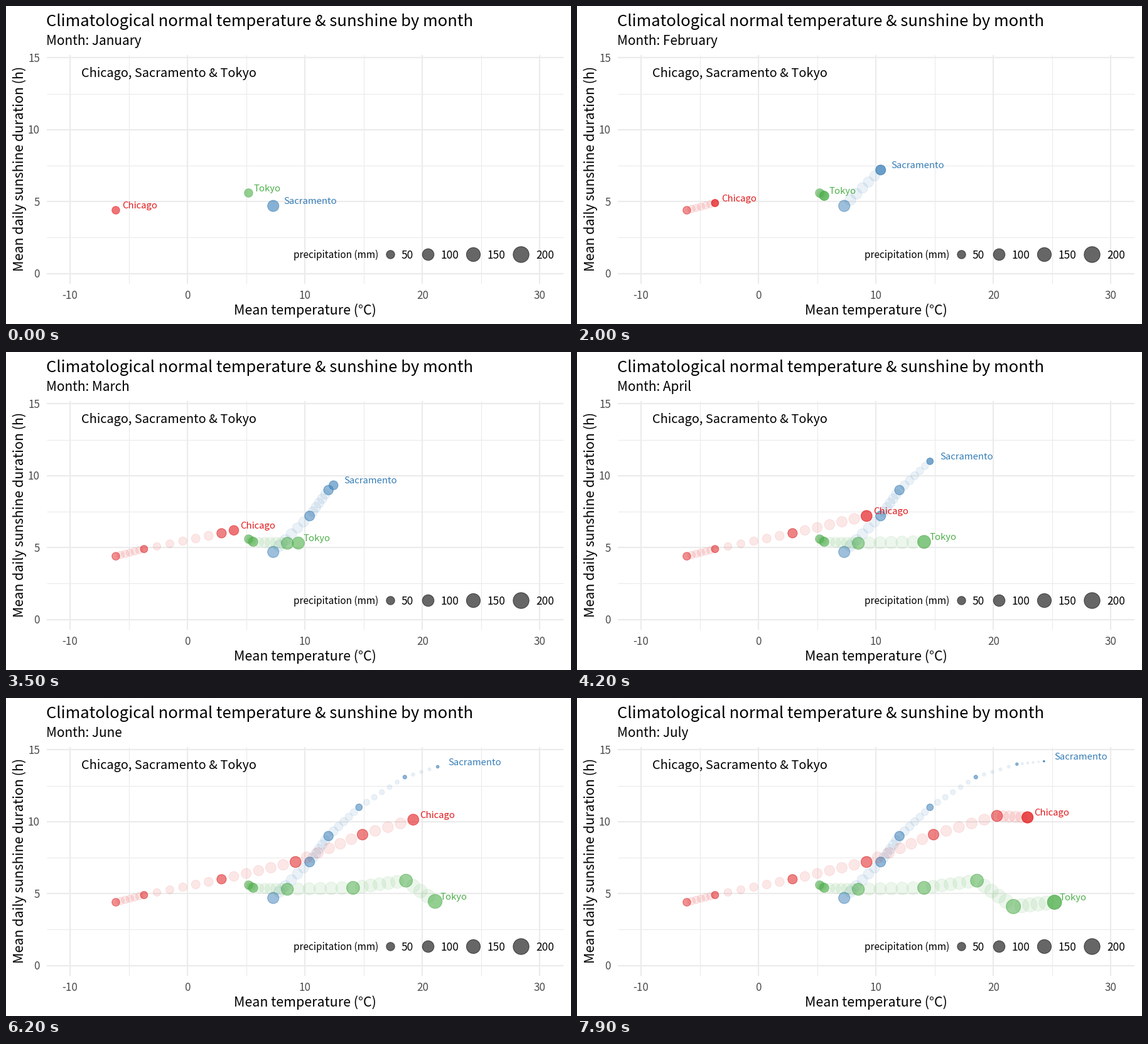
These frames come from a looping animation (900 px wide and 506 px high, 8000 ms). A matplotlib script:

```python
import math

import matplotlib.pyplot as plt
import numpy as np
from matplotlib.animation import FuncAnimation
from matplotlib.colors import to_rgba

W, H, DPI = 900, 506, 64
FRAMES, INTERVAL = 80, 100
PT = 72 / DPI  # points per pixel
START_PAUSE = 5
HOLD = 6
STEPS = [6, 6, 6, 6, 5, 5]
MONTHS = ["January", "February", "March", "April", "May", "June", "July"]

# name: colour, label offset, temperature, sunshine hours, dot radius in px
CITIES = {
    "Chicago": ("#E41A1C", 11.2,
                [-6.1, -3.7, 2.9, 9.2, 14.9, 20.3, 22.9],
                [4.4, 4.9, 6.0, 7.2, 9.1, 10.4, 10.3],
                [6.7, 6.3, 8.0, 9.3, 9.0, 9.4, 9.5]),
    "Sacramento": ("#377EB8", 16.9,
                   [7.3, 10.4, 12.0, 14.6, 18.5, 22.0, 24.3],
                   [4.7, 7.2, 9.0, 11.0, 13.1, 14.0, 14.2],
                   [9.5, 8.4, 8.1, 5.8, 3.5, 2.6, 1.7]),
    "Tokyo": ("#4DAF4A", 8.7,
              [5.2, 5.6, 8.5, 14.1, 18.6, 21.7, 25.2],
              [5.6, 5.4, 5.3, 5.4, 5.9, 4.1, 4.4],
              [7.2, 7.8, 10.1, 10.8, 10.8, 11.9, 11.8]),
}

plt.rcParams["font.family"] = "Noto Sans CJK JP"


def px(temp):
    return 289.1 + 18.7125 * np.asarray(temp)


def py(hours):
    return 425.7 - 22.89 * np.asarray(hours)


def timeline():
    """Month position of every step: hold, then move evenly to the next."""
    pos = [0.0] * HOLD
    for m, n in enumerate(STEPS):
        pos += [m + j / n for j in range(1, n + 1)]
        pos += [m + 1.0] * HOLD
    return np.array(pos)


fig = plt.figure(figsize=(W / DPI, H / DPI), dpi=DPI, facecolor="white")
ax = fig.add_axes([0, 0, 1, 1])
ax.set_xlim(0, W)
ax.set_ylim(H, 0)
ax.axis("off")


def text(x, y, s, size, color="black", **kw):
    return ax.text(x, y, s, fontsize=size * PT, color=color, **kw)


def grid(xs, ys, width):
    style = dict(color="#EBEBEB", lw=width * PT, zorder=0)
    ax.vlines(xs, 77.5, 442.3, **style)
    ax.hlines(ys, 65, 888, **style)


def dot_sizes(radius):
    return (2 * (np.asarray(radius) - 0.5) * PT) ** 2


def dots(xs, ys, radius, colors):
    return ax.scatter(xs, ys, s=dot_sizes(radius), c=colors,
                      linewidths=PT, edgecolors="face")


grid(px([-5, 5, 15, 25]), py([2.5, 7.5, 12.5]), 1.1)
grid(px([-10, 0, 10, 20, 30]), py([0, 5, 10, 15]), 2.1)

for t in range(-10, 31, 10):
    text(px(t), 466, str(t), 17.1, "#4D4D4D", ha="center")
for h in range(0, 16, 5):
    text(54, py(h) + 6.3, str(h), 17.1, "#4D4D4D", ha="right")

text(64, 31.5, "Climatological normal temperature & sunshine by month", 25.56)
month_text = text(64, 62.3, "", 20.8)
text(476, 491, "Mean temperature (°C)", 21.4, ha="center")
text(28, 259, "Mean daily sunshine duration (h)", 21.4, rotation=90,
     rotation_mode="anchor", ha="center", va="baseline")
text(120, 112.8, "Chicago, Sacramento & Tokyo", 20)

text(458.5, 401.3, "precipitation (mm)", 15.45)
legend = [(612.4, 7.2, 629.5, "50"), (671.5, 9.8, 692, "100"),
          (744, 11.6, 767, "150"), (819.5, 13.2, 844.5, "200")]
for cx, r, tx, s in legend:
    dots([cx], [395.4], [r], [(0, 0, 0, 0.6)])
    text(tx, 402, s, 17.3)

# Rows are steps, columns are cities
POS = timeline()
grid_m = np.arange(len(MONTHS))
X = np.column_stack([np.interp(POS, grid_m, px(c[2])) for c in CITIES.values()])
Y = np.column_stack([np.interp(POS, grid_m, py(c[3])) for c in CITIES.values()])
R = np.column_stack([np.interp(POS, grid_m, c[4]) for c in CITIES.values()])
RGBA = np.array([to_rgba(c[0]) for c in CITIES.values()])

trail = dots(X[0], Y[0], R[0], RGBA)
labels = [text(0, 0, name, 14.85, c[0], zorder=5)
          for name, c in CITIES.items()]


def draw(frame):
    i = max(0, frame - START_PAUSE)
    colors = np.tile(RGBA, (i + 1, 1))
    colors[:, 3] = 0.1
    colors[-len(CITIES):, 3] = 0.6
    trail.set_offsets(np.column_stack([X[:i + 1].ravel(), Y[:i + 1].ravel()]))
    trail.set_sizes(dot_sizes(R[:i + 1].ravel()), DPI)
    trail.set_facecolor(colors)
    trail.set_edgecolor(colors)
    for label, city, x, y in zip(labels, CITIES.values(), X[i], Y[i]):
        label.set_position((x + city[1] - 0.6, y - 2.7))
    month_text.set_text("Month: " + MONTHS[math.ceil(POS[i] - 0.5)])
    return [trail, month_text, *labels]


def init():
    return draw(0)


anim = FuncAnimation(fig, draw, frames=FRAMES, init_func=init,
                     interval=INTERVAL, repeat=True, repeat_delay=0)
plt.show()
```
